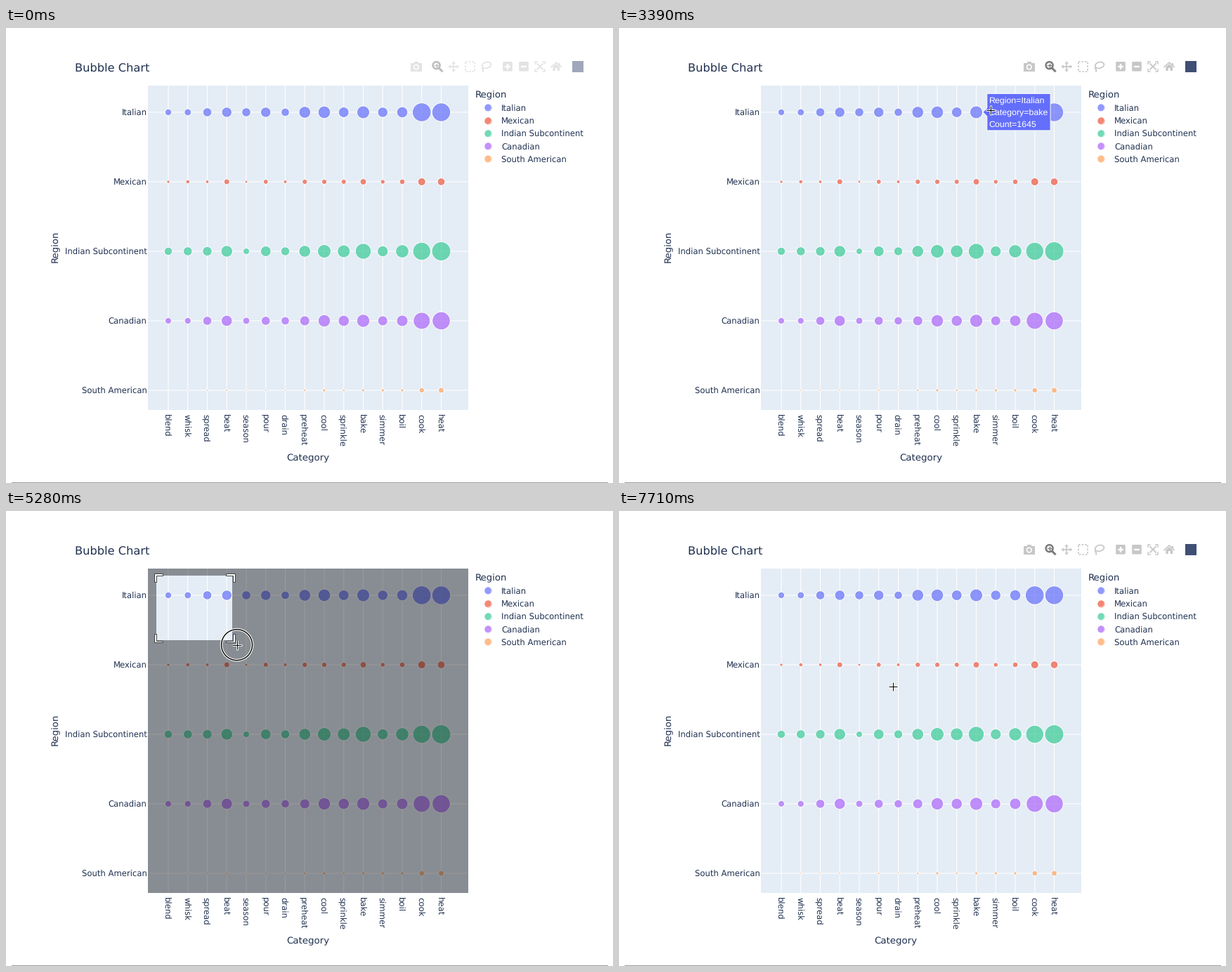
Recreate the animation shown at these times as a matplotlib script. Size 864 by 648 pixels, loop 8250 ms.

```python
import numpy as np
import matplotlib.pyplot as plt
from matplotlib.animation import FuncAnimation
from matplotlib.patches import Circle, Ellipse, FancyBboxPatch, PathPatch, Polygon, Rectangle
from matplotlib.path import Path

W, H = 864, 648
STEP, LOOP = 30, 8250
INK, PAPER = "#1f3050", "#e4ecf5"
TOP, BOTTOM, RIGHT = 82, 543.5, 657.5

REGIONS = ["Italian", "Mexican", "Indian Subcontinent", "Canadian", "South American"]
COLORS = ["#636efa", "#ef553b", "#37cb95", "#ab63fa", "#ffa15a"]
VERBS = ("blend whisk spread beat season pour drain preheat cool "
         "sprinkle bake simmer boil cook heat").split()
RADII = np.array([
    [4.75, 5, 6.4, 7.3, 6.4, 7.3, 5.9, 8.4, 8.9, 7.5, 9.1, 7.3, 7.9, 13.4, 13.3],
    [2.3, 2.9, 2.5, 4.1, 2.1, 3.5, 2.6, 3.7, 3.7, 3.6, 4.5, 3.3, 3.9, 5.6, 5.4],
    [5.8, 6.4, 6.8, 8.3, 4.6, 7.5, 6.3, 8.4, 9.6, 9.1, 11.3, 7.7, 9.4, 12.8, 13.6],
    [4.6, 4.7, 6.4, 7.9, 5, 6.4, 5.9, 7.1, 8.8, 7.9, 9.3, 7.1, 8.1, 12.1, 12.9],
    [1.1, 1.4, 1.5, 1.6, 1.4, 1.6, 1.5, 1.8, 2.3, 1.8, 2.2, 2.3, 2.3, 3.8, 4]])
COUNTS = np.rint(19.86 * RADII ** 2).astype(int)
XS = 231 + 27.75 * np.arange(len(VERBS))
YS = 120 + 99.0 * np.arange(len(REGIONS))

# Timeline in ms
ENTER, PRESS, DRAG, DROP = 660, 4740, 4900, 5560
RELEASE, ZOOM, RESET = 5850, 6060, 7290
START, END = np.array([214, 92]), np.array([401, 253])
PATH_T = [ENTER, 1320, 1470, 2100, 3390, 3750, 3900, 4560]
PATH_X = [120, 226, 229, 233, 529, 617, 619, 214]
PATH_Y = [590, 128, 122, 121, 117, 120, 119, 92]

plt.rcParams.update({"font.family": "DejaVu Sans", "text.hinting": "none"})
fig = plt.figure(figsize=(W / 72, H / 72), dpi=72, facecolor="white")
ax = fig.add_axes([0, 0, 1, 1])
ax.set_xlim(0, W)
ax.set_ylim(H, 0)
ax.axis("off")


def add(patch, z):
    patch.set_zorder(z)
    return ax.add_patch(patch)


def line(xs, ys, color, lw, z, **kw):
    return ax.plot(xs, ys, color=color, lw=lw, zorder=z, **kw)[0]


def label(x, y, s, size=11.6, color=INK, z=4, **kw):
    kw = {"va": "baseline", "rotation_mode": "anchor", **kw}
    return ax.text(x, y, s, fontsize=size, color=color, zorder=z, **kw)


def bubbles(xs, y, radii, color):
    """Translucent discs, each with an unmixed white rim."""
    radii = np.asarray(radii)
    ys = np.full(len(xs), y)
    return [ax.scatter(xs, ys, s=4 * (radii - 0.5) ** 2, c=color, linewidths=0,
                       alpha=0.7, zorder=3),
            ax.scatter(xs, ys, s=4 * radii ** 2, facecolors="none", edgecolors="white",
                       linewidths=1, alpha=0.7, zorder=3.1)]


def smooth(u):
    u = np.clip(u, 0, 1)
    return u * u * (3 - 2 * u)


def build_view(left, xs, ys, flat):
    """Plot area with its grid, bubbles and tick labels."""
    area = add(Rectangle((left, TOP), RIGHT - left, BOTTOM - TOP, fc=PAPER, lw=0), 1)
    parts = [area]
    cols = [i for i, x in enumerate(xs) if x < RIGHT]
    rows = [j for j, y in enumerate(ys) if y < BOTTOM]
    for i in cols:
        parts.append(line([xs[i]] * 2, [TOP, BOTTOM], "white", 1.1, 2, snap=False))
        if flat:
            parts.append(label(xs[i], 558, VERBS[i], ha="center"))
        else:
            parts.append(label(xs[i] - 5.5, 550, VERBS[i], rotation=270, ha="left"))
    for j in rows:
        parts.append(line([left, RIGHT], [ys[j]] * 2, "white", 1.1, 2, snap=False))
        parts.append(label(left - 1, ys[j] + 4.3, REGIONS[j], ha="right"))
        for dots in bubbles(xs, ys[j], RADII[j], COLORS[j]):
            dots.set_clip_path(area)
            parts.append(dots)
    return parts


def draw_modebar():
    grey, dark = "#c7c7c7", "#7c7c7c"
    # camera
    add(Rectangle((576, 50), 15.5, 11.5, fc=grey, lw=0), 5)
    add(Rectangle((580.5, 48), 6.5, 3, fc=grey, lw=0), 5)
    add(Circle((583.8, 55.6), 3.3, fc=grey, ec="white", lw=1.6), 5)
    # zoom
    add(Circle((612.6, 53.2), 5, fc="white", ec=dark, lw=2.5), 5)
    line([616.5, 620.5], [57.2, 61.2], dark, 3, 5)
    line([610.2, 615], [53.2, 53.2], dark, 1.4, 5)
    line([612.6, 612.6], [50.8, 55.6], dark, 1.4, 5)
    # pan
    line([631, 643.5], [55, 55], grey, 1.7, 5)
    line([637.2, 637.2], [49, 61], grey, 1.7, 5)
    for dx, dy in ((1, 0), (-1, 0), (0, 1), (0, -1)):
        tip = np.array([637.2 + 7.6 * dx, 55 + 7.6 * dy])
        back, side = np.array([dx, dy]) * 3.2, np.array([dy, dx]) * 2.8
        add(Polygon([tip, tip - back + side, tip - back - side], fc=grey, lw=0), 5)
    # box select
    add(Rectangle((653.5, 48), 13.6, 13.6, fill=False, ec=grey, lw=1.7,
                  ls=(0, (1.5, 1.2))), 5)
    # lasso
    add(Ellipse((684, 53), 13, 8.5, angle=-15, fill=False, ec=grey, lw=1.7), 5)
    line([678.5, 677.6, 679.5, 679], [56, 58, 59.5, 62], grey, 1.6, 5)
    # zoom in and out
    for x in (714, 737):
        add(FancyBboxPatch((x - 5.8, 49), 11.6, 11.6, fc=grey, lw=0,
                           boxstyle="round,pad=1,rounding_size=1.5"), 5)
        line([x - 4, x + 4], [54.8, 54.8], "white", 2.4, 5, solid_capstyle="butt")
    line([714, 714], [50.8, 58.8], "white", 2.4, 5, solid_capstyle="butt")
    # autoscale
    for sx in (-1, 1):
        line([760 - 4 * sx, 760 + 4 * sx], [50.8, 58.8], grey, 1.8, 5)
        for sy in (-1, 1):
            line(760 + sx * np.array([3.8, 7, 7]), 54.8 + sy * np.array([7, 7, 3.8]),
                 grey, 1.5, 5)
    # home
    line([776.2, 783.2, 790.2], [55.5, 49, 55.5], grey, 1.7, 5)
    add(Polygon([(778.4, 55.6), (783.2, 51.2), (788, 55.6), (788, 61), (784.7, 61),
                 (784.7, 57), (781.7, 57), (781.7, 61), (778.4, 61)], fc=grey, lw=0), 5)
    add(Rectangle((787, 49.5), 1.7, 3.5, fc=grey, lw=0), 5)
    # plain square in place of the badge
    add(Rectangle((806, 47), 16, 16, fc="#3f4f75", lw=0), 5)


def draw_legend():
    label(668, 99, "Region", 13.3)
    for j, (name, color) in enumerate(zip(REGIONS, COLORS)):
        y = 113.3 + 18.25 * j
        bubbles([685.5], y, [5.7], color)
        label(705, y + 4.3, name)


full_view = build_view(201.5, XS, YS, flat=False)
ZOOM_LEFT = 131
zoom_view = build_view(ZOOM_LEFT,
                       ZOOM_LEFT + (XS - START[0]) * (RIGHT - ZOOM_LEFT) / 187,
                       TOP + (YS - START[1]) * (BOTTOM - TOP) / 160, flat=True)
draw_modebar()
veil = add(Rectangle((570, 44), 260, 23, fc="white", lw=0), 6)
draw_legend()
label(98, 62, "Bubble Chart", 16.2)
label(73.8, 311, "Region", 13.3, rotation=90, ha="center")
x_title = label(429.5, 616.5, "Category", 13.4, ha="center")
line([8, 856], [647.3, 647.3], "#9a9a9a", 1, 4)

# Drag box
shade = add(PathPatch(Path([(0, 0), (1, 1)]), fc="black", alpha=0.4, lw=0), 7)
corners = [add(Polygon([(0, 0), (1, 1)], fc="white", ec="#444444", lw=1), 8)
           for _ in range(4)]

# Hover label
tip_box = add(Polygon([(0, 0), (1, 1)], ec="white", lw=1), 9)
tip_text = [ax.text(0, 0, "", fontsize=12.4, family="Liberation Sans", color="white",
                    va="baseline", zorder=10) for _ in range(3)]

# Pointer and press ring
cross = [line([], [], c, w, z, solid_capstyle="butt")
         for c, w, z in (("white", 2.8, 12), ("black", 1, 13))]
rings = [add(Circle((0, 0), 22, fill=False, ec=c, lw=w), z)
         for c, w, z in (("white", 3.6, 12), ("black", 1.4, 13))]


def pointer(t):
    if t < PRESS:
        return np.array([np.interp(t, PATH_T, PATH_X), np.interp(t, PATH_T, PATH_Y)])
    if t < ZOOM:
        return START + (END - START) * smooth((t - DRAG) / (DROP - DRAG))
    return END + np.array([-11, -3]) * smooth((t - 6300) / 700)


def modebar_level(t):
    if t < PRESS:
        return np.interp(t, [480, 660], [0.5, 1])
    return np.interp(t, [PRESS, PRESS + 300, ZOOM, ZOOM + 300], [1, 0, 0, 1])


def show_hover(t):
    x, y = pointer(t - 60)
    gap = np.hypot(XS[None, :] - x, YS[:, None] - y) - RADII
    j, i = np.unravel_index(gap.argmin(), gap.shape)
    on = ENTER + 60 < t < PRESS and x > 201 and gap[j, i] < 20
    for part in [tip_box, *tip_text]:
        part.set_visible(on)
    if not on:
        return
    tip, mid = XS[i] + RADII[j, i] + 0.2, YS[j] - 0.2
    left = tip + 6
    rows = (f"Region={REGIONS[j]}", f"Category={VERBS[i]}", f"Count={COUNTS[j, i]}")
    for k, (text, row) in enumerate(zip(tip_text, rows)):
        text.set_text(row)
        text.set_position((left + 2.7, mid - 11.8 + 16.3 * k))
    right = left + 6 + max(text.get_window_extent().width for text in tip_text)
    top, bottom = mid - 26.4, mid + 26.2
    tip_box.set_facecolor(COLORS[j])
    tip_box.set_xy([(tip, mid), (left, mid - 6), (left, top), (right, top),
                    (right, bottom), (left, bottom), (left, mid + 6)])


def show_drag_box(t):
    x0, y0 = START
    x1, y1 = pointer(min(t, ZOOM - 1) - 15) - (0, 1)
    on = PRESS < t < ZOOM and x1 - x0 > 8
    for part in [shade, *corners]:
        part.set_visible(on)
    if not on:
        return
    outer = [(201.5, TOP), (RIGHT, TOP), (RIGHT, BOTTOM), (201.5, BOTTOM), (201.5, TOP)]
    inner = [(x0, y0), (x0, y1), (x1, y1), (x1, y0), (x0, y0)]
    codes = [Path.MOVETO, *[Path.LINETO] * 3, Path.CLOSEPOLY]
    shade.set_path(Path(outer + inner, codes * 2))
    arm = min(x1 - x0, y1 - y0, 18) / 2
    spots = [(x0, y0, 1, 1), (x1, y0, -1, 1), (x1, y1, -1, -1), (x0, y1, 1, -1)]
    shape = np.array([(-3.2, arm), (-0.4, arm), (-0.4, -0.4), (arm, -0.4),
                      (arm, -3.2), (-3.2, -3.2)])
    for corner, (x, y, sx, sy) in zip(corners, spots):
        corner.set_xy(shape * (sx, sy) + (x, y))


def show_pointer(t):
    x, y = pointer(t)
    on = t >= ENTER and x > 201
    for arm, part in zip((7, 6.3), cross):
        part.set_visible(on)
        part.set_data([x - arm, x + arm, np.nan, x, x], [y, y, np.nan, y - arm, y + arm])
    pressed = PRESS < t < RELEASE or 7020 <= t < 7110 or 7200 <= t < RESET
    for ring in rings:
        ring.set_visible(pressed)
        ring.center = x, y


def update(n):
    t = n * STEP
    zoomed = ZOOM <= t < RESET
    for part in full_view:
        part.set_visible(not zoomed)
    for part in zoom_view:
        part.set_visible(zoomed)
    x_title.set_position((429.5 if t < ZOOM else 394, 584 if zoomed else 616.5))
    veil.set_alpha(1 - modebar_level(t))
    show_hover(t)
    show_drag_box(t)
    show_pointer(t)
    return []


anim = FuncAnimation(fig, update, frames=LOOP // STEP, interval=STEP, repeat=True)
plt.show()
```
